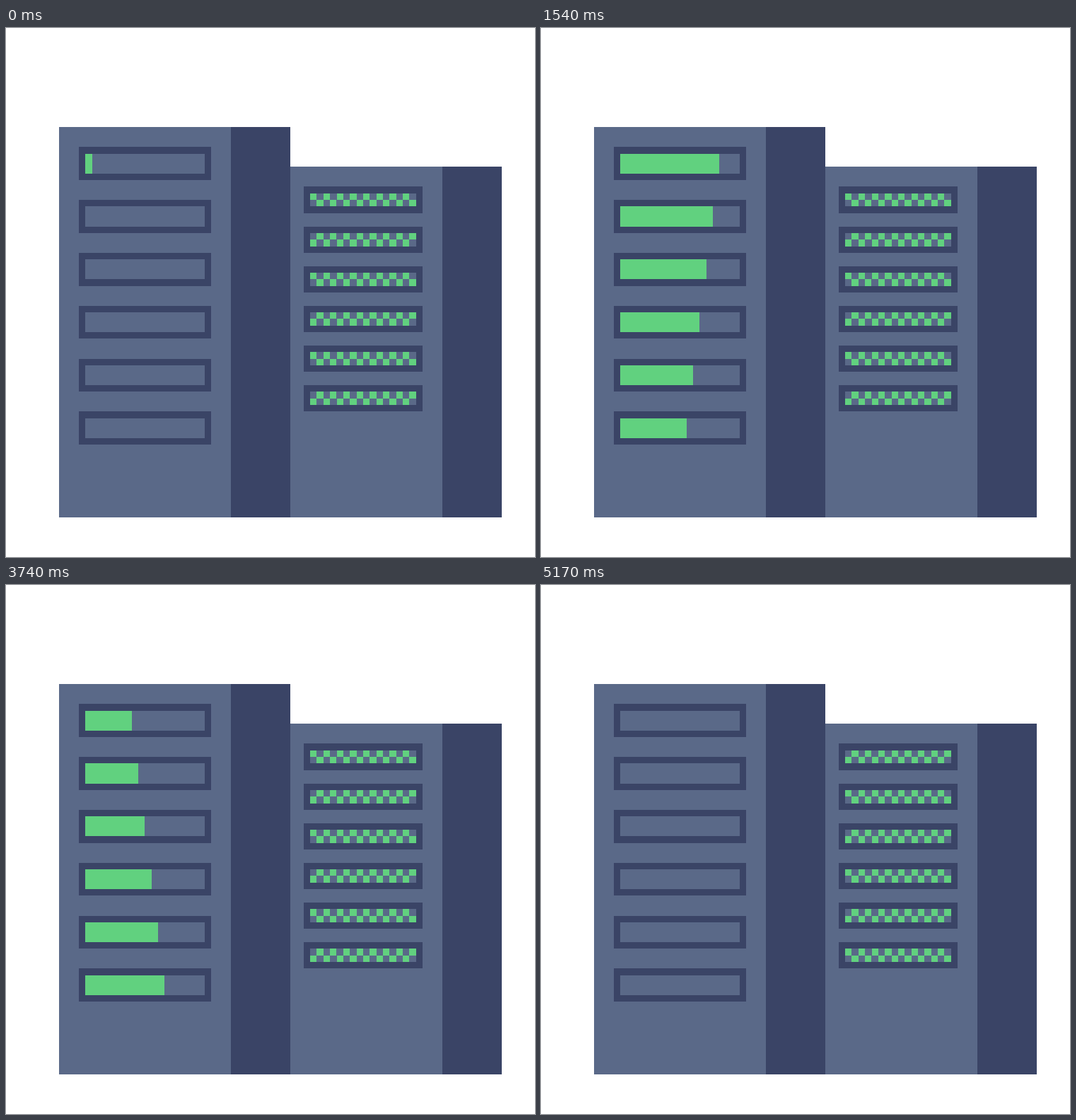
These frames come from a looping animation (748 by 748 pixels, 5.28 s). An HTML page without scripts:

```html
<!DOCTYPE html>
<html lang="en">
<head>
<meta charset="utf-8">
<title>Server racks</title>
<style>
  :root { --light: #5a6988; --dark: #3a4466; --lit: #61d17f; --tick: 110ms; }
  html, body { margin: 0; width: 100%; height: 100%; overflow: hidden; background: #fff; }
  svg { display: block; width: 100%; height: 100%; shape-rendering: crispEdges; }
  .light { fill: var(--light); }
  .dark { fill: var(--dark); }
  .lit { fill: var(--lit); }

  /* each bar runs one tick behind the bar above it */
  .bar {
    fill: var(--lit);
    animation: load calc(48 * var(--tick)) steps(18, end) infinite;
    animation-delay: calc((var(--row) - 49) * var(--tick) - .5ms);
  }
  @keyframes load {
    0% { width: 0; }
    37.5%, 50% { width: 18px; }
    87.5%, 100% { width: 0; }
  }

  .blink { animation: blink calc(2 * var(--tick)) step-end -.5ms infinite; }
  .late { animation-delay: calc(-1 * var(--tick) - .5ms); }
  @keyframes blink {
    0% { visibility: visible; }
    50%, 100% { visibility: hidden; }
  }
</style>
</head>
<body>
<svg viewBox="0 0 80 80">
  <defs>
    <g id="wide">
      <path class="dark" d="M11 18h20v5h-20z"/>
      <path class="light" d="M12 19h18v3h-18z"/>
    </g>
    <g id="slim">
      <path class="dark" d="M45 24h18v4h-18z"/>
      <path class="light" d="M46 25h16v2h-16z"/>
    </g>

    <!-- checkered lamps, doubled up to 16 columns -->
    <path id="pair" d="M0 0h1v1h1v1h-1v-1h-1z"/>
    <g id="two"><use href="#pair"/><use href="#pair" x="2"/></g>
    <g id="four"><use href="#two"/><use href="#two" x="4"/></g>
    <g id="lamps"><use href="#four"/><use href="#four" x="8"/></g>
    <g id="flip"><use href="#lamps" transform="matrix(1 0 0 -1 0 2)"/></g>
  </defs>

  <path class="light" d="M8 15h26v59h-26z"/>
  <path class="dark" d="M34 15h9v59h-9z"/>
  <path class="light" d="M43 21h23v53h-23z"/>
  <path class="dark" d="M66 21h9v53h-9z"/>

  <use href="#wide"/>
  <use href="#wide" y="8"/>
  <use href="#wide" y="16"/>
  <use href="#wide" y="24"/>
  <use href="#wide" y="32"/>
  <use href="#wide" y="40"/>

  <rect class="bar" style="--row:0" x="12" y="19" height="3"/>
  <rect class="bar" style="--row:1" x="12" y="27" height="3"/>
  <rect class="bar" style="--row:2" x="12" y="35" height="3"/>
  <rect class="bar" style="--row:3" x="12" y="43" height="3"/>
  <rect class="bar" style="--row:4" x="12" y="51" height="3"/>
  <rect class="bar" style="--row:5" x="12" y="59" height="3"/>

  <use href="#slim"/>
  <use href="#slim" y="6"/>
  <use href="#slim" y="12"/>
  <use href="#slim" y="18"/>
  <use href="#slim" y="24"/>
  <use href="#slim" y="30"/>

  <g class="lit blink">
    <use href="#lamps" x="46" y="25"/>
    <use href="#flip" x="46" y="31"/>
    <use href="#lamps" x="46" y="37"/>
    <use href="#flip" x="46" y="43"/>
    <use href="#lamps" x="46" y="49"/>
    <use href="#flip" x="46" y="55"/>
  </g>
  <g class="lit blink late">
    <use href="#flip" x="46" y="25"/>
    <use href="#lamps" x="46" y="31"/>
    <use href="#flip" x="46" y="37"/>
    <use href="#lamps" x="46" y="43"/>
    <use href="#flip" x="46" y="49"/>
    <use href="#lamps" x="46" y="55"/>
  </g>
</svg>
</body>
</html>
```
